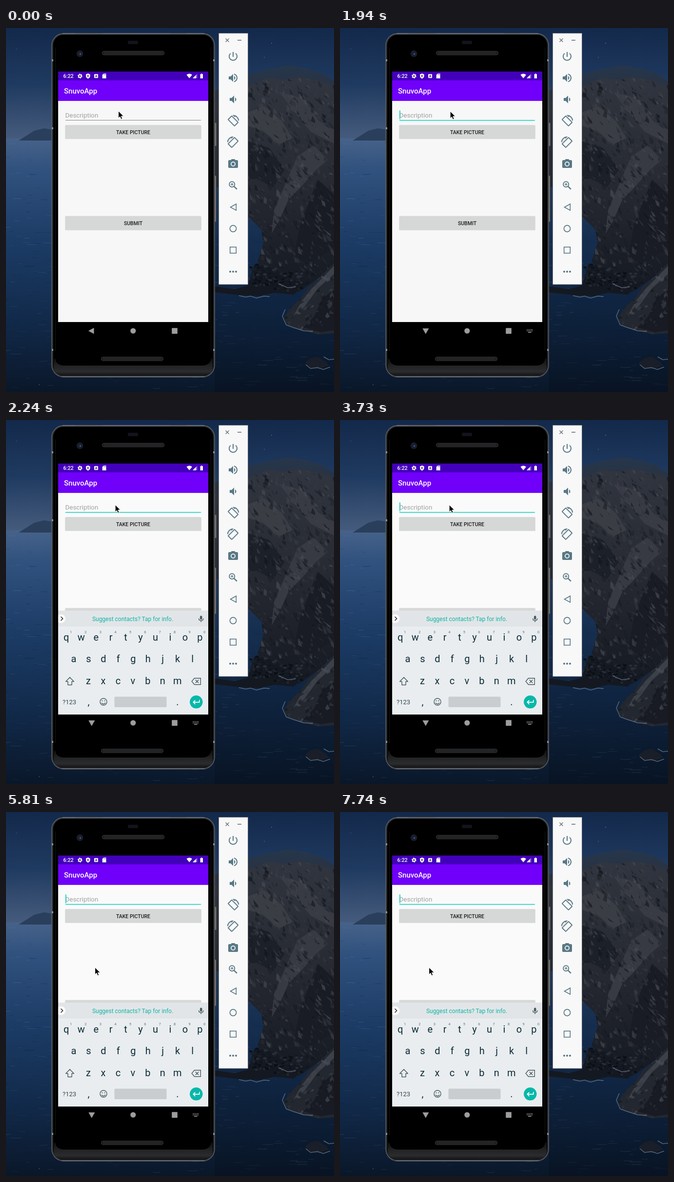
Animation of 673 by 744 pixels, one loop 8000 ms. Source, as an HTML page:

```html
<!DOCTYPE html>
<html lang="en">
<head>
<meta charset="utf-8">
<title>Phone emulator</title>
<style>
html, body { margin: 0; width: 100%; height: 100%; overflow: hidden; background: #0b1d38; }
svg { display: block; }
text { font-family: Roboto, sans-serif; }
.mid { text-anchor: middle; }
.med { font-weight: 500; }
.line { fill: none; stroke: #587885; stroke-width: 1.8; }
.tool { fill: #587885; }
.key { font-size: 20px; fill: #0d2c36; }
.hint { font-size: 7.5px; fill: #5d6f77; }
.thin { fill: none; stroke: #48595f; stroke-width: 1.4; }
</style>
</head>
<body>
<svg id="stage" width="673" height="744" viewBox="0 0 673 744">
<defs>
  <linearGradient id="sky" x2="0" y2="1">
    <stop offset="0" stop-color="#13294b"/><stop offset=".5" stop-color="#1f3a60"/><stop offset="1" stop-color="#475d7e"/>
  </linearGradient>
  <linearGradient id="sea" x2="0" y2="1">
    <stop offset="0" stop-color="#46628a"/><stop offset=".12" stop-color="#31527e"/><stop offset=".4" stop-color="#1c3c66"/>
    <stop offset=".7" stop-color="#122b4c"/><stop offset="1" stop-color="#0a1729"/>
  </linearGradient>
  <linearGradient id="far" x2="0" y2="1">
    <stop offset="0" stop-color="#26364c"/><stop offset=".4" stop-color="#2a313d"/><stop offset="1" stop-color="#22262f"/>
  </linearGradient>
  <linearGradient id="cliff" x2="0" y2="1">
    <stop offset="0" stop-color="#30353f"/><stop offset=".45" stop-color="#282b33"/><stop offset="1" stop-color="#151922"/>
  </linearGradient>
  <linearGradient id="chin" x2="0" y2="1">
    <stop offset="0" stop-color="#060606"/><stop offset=".45" stop-color="#202123"/><stop offset=".8" stop-color="#2b2c2e"/><stop offset="1" stop-color="#141415"/>
  </linearGradient>
  <clipPath id="screen"><rect x="107" y="89" width="308" height="513"/></clipPath>
  <clipPath id="land"><path id="coast" d="M428 150L497 118 540 102 572 106 600 100 640 108 673 118V482L640 512 600 540 560 524 530 492 516 478 528 440 524 412 497 386 428 320Z"/></clipPath>
  <clipPath id="crag"><path id="crest" d="M673 480L648 506 622 528 605 552 584 572 570 592 577 608 606 618 640 626 673 624Z"/></clipPath>
</defs>

<g id="wallpaper">
  <rect width="673" height="230" fill="url(#sky)"/>
  <rect y="226" width="673" height="518" fill="url(#sea)"/>
  <path d="M26 230L42 220 58 210 78 205 97 208V230Z" fill="#2a3f5c"/>
  <rect x="428" y="300" width="245" height="444" fill="#060c16" opacity=".28"/>
  <g id="waves"></g>
  <path d="M428 128L470 108 497 94 530 86 555 80 580 76 620 83 648 92 673 108V260H428Z" fill="url(#far)"/>
  <use href="#coast" fill="url(#cliff)"/>
  <g id="rocks" clip-path="url(#land)">
    <path d="M497 172L530 160 566 190 588 225 560 238 530 212 497 200Z" fill="#3b3d45"/>
    <path d="M560 130L612 145 642 190 673 208V236L625 212 592 172Z" fill="#393b44"/>
    <path d="M497 232L540 245 572 290 548 326 515 308 497 310Z" fill="#1c2028"/>
    <path d="M598 262L632 240 660 270 636 290 605 325 580 350 560 395 545 420 550 372Z" fill="#383a43"/>
    <path d="M640 310L673 340V450L625 480 590 470 604 400Z" fill="#191c24"/>
  </g>
  <g id="grit" clip-path="url(#land)"></g>
  <path d="M428 528L470 534 497 526 510 482 550 492 590 515 618 522 590 545 550 541 520 548 480 546 428 540Z" fill="#141820"/>
  <g id="boulders"></g>
  <use href="#crest" fill="#23272f"/>
  <path d="M673 486L650 510 627 533 607 558 590 588 612 570 640 532 673 503Z" fill="#3b4049"/>
  <path d="M673 535L650 552 632 590 610 612 645 622 673 618Z" fill="#181b23"/>
  <g id="cracks" clip-path="url(#crag)"></g>
  <path d="M613 684L625 675 640 672 655 681 663 690 642 697 622 695Z" fill="#191e28"/>
  <g fill="none" stroke="#8296ad" stroke-width="1.5" opacity=".6">
    <path d="M478 547l14 3 10-2 12 4 15-4 12 1M573 575l-6 14 8 18 14 5 22 7 19 1M615 688l10 8 14-2 12 4 14-5M652 672l10 6 11-1M560 523l18 8 16-2"/>
  </g>
  <g fill="#7f93b3"><circle cx="545" cy="31" r=".8"/><circle cx="530" cy="60" r=".7"/><circle cx="68" cy="729" r=".7"/><circle cx="22" cy="43" r=".6"/></g>
</g>

<g id="phone">
  <path d="M428 194h4v47h-4zM428 302h3.500v94h-3.500z" fill="#6e6f70"/>
  <path d="M432 194v47M431.500 302v94" stroke="#2d2e30"/>
  <rect x="94" y="11.500" width="334" height="701.500" rx="24" fill="#242527" stroke="#67696b" stroke-width="1.300"/>
  <path d="M116 11.500H407M114 712.800H408" stroke="#808285" stroke-width="1.300"/>
  <path d="M141 10.600h57M336 10.600h34" stroke="#45474a" stroke-width="1.200"/>
  <path d="M94 66h4M424 66h4M94 205h4M94 658h4M424 658h4" stroke="#8a9196" stroke-width="4"/>
  <rect x="97" y="14" width="328" height="696" rx="21"/>
  <path d="M98 672Q101 688 116 690H406Q421 688 424 672V690Q424 710 405 710H117Q98 710 98 690Z" fill="url(#chin)"/>
  <path d="M100 676Q102 690 119 691H403Q420 690 422 676" fill="none" stroke="#28292b"/>
  <path d="M101.500 40V660M420.500 40V660" stroke="#151618"/>
  <rect x="250" y="26" width="21" height="7" rx="2" fill="#12131b"/>
  <g fill="#1b1c1e" stroke="#38393b">
    <rect x="197.500" y="47.500" width="127" height="7.500" rx="3.500"/><rect x="195.500" y="672.500" width="127" height="7.500" rx="3.500"/>
  </g>
  <path d="M202 51.300H320M200 676.300H318" stroke="#303134" stroke-width="3" stroke-dasharray="1.500 1.500"/>
  <circle cx="151.500" cy="52.500" r="6.800" fill="#1b1e24"/>
  <circle cx="152" cy="53" r="3.500" fill="#15203d"/><circle cx="152.500" cy="53" r="1.500" fill="#4563a3"/>
</g>

<g clip-path="url(#screen)">
  <rect id="page" x="107" y="89" width="308" height="512"/>
  <rect x="107" y="107" width="308" height="42" fill="#7000fa"/>
  <rect x="107" y="89" width="308" height="18" fill="#4300ba"/>
  <text class="med" x="117.500" y="102" font-size="10.700" fill="#fff">6:22</text>
  <g fill="#fff">
    <circle cx="151.800" cy="98.200" r="2.700" fill="none" stroke="#fff" stroke-width="2"/>
    <circle cx="151.800" cy="98.200" r="4.200" fill="none" stroke="#fff" stroke-width="1.400" stroke-dasharray="2.200 2.198"/>
    <path d="M168.300 93l4.300 1.700v3.300q0 3.700-4.300 5.500-4.300-1.800-4.300-5.500v-3.300z"/>
    <path d="M167 95.800l3.600 2.300-3.600 2.300z" fill="#4300ba"/>
    <rect x="181" y="94.200" width="8" height="8" rx="1"/>
    <path d="M183.200 100.600l1.800-4.600 1.800 4.600M183.900 99.200h2.200" fill="none" stroke="#4300ba"/>
    <path d="M200.300 93.200h5.200v9.700h-7.800v-7.200z"/>
    <path d="M201 94.500v1.800M202.700 94.500v1.800M204.300 94.500v1.800" stroke="#4300ba" stroke-width=".7"/>
    <path d="M370.500 95.700q5.700-4.400 11.400 0l-5.700 7.100z"/>
    <path d="M392.300 93.600v9.200h-9.200z" opacity=".4"/><path d="M389.600 96.300v6.500h-6.500z"/>
    <path d="M400.300 93.200h2v1h1.700v8.800h-5.400v-8.800h1.700z"/>
  </g>
  <text class="med" x="119" y="134" font-size="15" fill="#fff">SnuvoApp</text>
  <text x="121.500" y="182.800" font-size="13.400" fill="#a0a0a0">Description</text>
  <rect id="rule" x="122" y="188" width="278"/>
  <rect id="caret" x="122" y="168.500" width="1.600" height="18" fill="#00cdb9"/>
  <g class="med mid" font-size="10.500" fill="#1d1d1d">
    <g fill="#dcdddd"><rect x="121" y="198.500" width="280" height="28.500" rx="1.500"/><rect x="121" y="384.500" width="280" height="29" rx="1.500"/></g>
    <g fill="#d6d7d7"><rect x="122" y="198.500" width="278" height="27.800" rx="1.500"/><rect x="122" y="384.500" width="278" height="28.300" rx="1.500"/></g>
    <text x="261" y="216.500">TAKE PICTURE</text><text x="261" y="402.500">SUBMIT</text>
  </g>
  <g id="keyboard">
    <rect id="strip" x="107" y="389.500" width="308" height="33"/>
    <rect id="bed" x="107" y="422" width="308" height="180"/>
    <circle cx="113" cy="406" r="9" fill="#fdfdfd"/>
    <path d="M112.500 402l4 4-4 4" fill="none" stroke="#222" stroke-width="1.500"/>
    <text class="mid" x="260" y="410.500" font-size="12" fill="#0fb5a6">Suggest contacts? Tap for info.</text>
    <rect x="398" y="400" width="4.400" height="8" rx="2.200" fill="#4a5960"/>
    <path d="M395.600 405.500q0 4.500 4.600 4.500 4.600 0 4.600-4.500M400.200 410v3" class="thin" stroke-width="1.200"/>
    <g id="keys"></g>
    <path d="M131 526l8.300 8.500h-4.300v7h-8v-7h-4.300z" class="thin" stroke-linejoin="round"/>
    <path d="M386.500 527.700h12.800v13h-12.800l-5.300-6.500zM388.700 530.900l6.600 6.600M395.300 530.900l-6.600 6.600" class="thin"/>
    <text x="116" y="580.500" font-size="13" fill="#34474f">?123</text>
    <g class="thin"><circle cx="200" cy="576" r="7"/><path d="M196 578q4 5 8 0"/></g>
    <circle cx="197.500" cy="574" r="1.100" fill="#48595f"/><circle cx="202.500" cy="574" r="1.100" fill="#48595f"/>
    <rect id="space" x="222.500" y="565.500" width="107" height="21.500" rx="2"/>
    <circle cx="390.300" cy="576.300" r="13.200" fill="#06b8a9"/>
    <path d="M396.800 572.200v4.600h-12M388.300 572.800l-4 4 4 4" fill="none" stroke="#fff" stroke-width="1.700"/>
  </g>
</g>

<g fill="#9d9d9d">
  <path id="back"/>
  <circle cx="260.800" cy="619" r="5.600"/><rect x="340.200" y="613.300" width="11.600" height="11.600" rx="1"/>
  <g id="kbIcon" fill="none" stroke="#9d9d9d" stroke-width="1.600">
    <path d="M383.200 616.500h12M383.200 619.300h12" stroke-dasharray="1.500 1.100"/><path d="M385.800 622h6.800"/>
  </g>
</g>

<g id="panel">
  <rect x="436.500" y="10.800" width="60" height="513.400" fill="#f8f8f8" stroke="#5c626a" stroke-width=".7"/>
  <path d="M450.500 21.500l7 7M457.500 21.500l-7 7M475 25h8" stroke="#5d6870" stroke-width="1.300"/>
  <g class="tool">
    <path transform="translate(454 46)" d="M13 3h-2v10h2V3zm4.830 2.170l-1.420 1.420C17.990 7.860 19 9.810 19 12c0 3.870-3.130 7-7 7s-7-3.130-7-7c0-2.190 1.010-4.140 2.580-5.420L6.170 5.170C4.230 6.820 3 9.260 3 12c0 4.970 4.030 9 9 9s9-4.030 9-9c0-2.740-1.230-5.180-3.170-6.830z"/>
    <path transform="translate(454 90)" d="M3 9v6h4l5 5V4L7 9H3zm13.500 3c0-1.770-1.020-3.290-2.500-4.030v8.050c1.480-.73 2.500-2.250 2.500-4.020zM14 3.230v2.060c2.890.86 5 3.540 5 6.710s-2.110 5.850-5 6.710v2.060c4.010-.91 7-4.490 7-8.770s-2.990-7.860-7-8.770z"/>
    <path transform="translate(454 134)" d="M18.500 12c0-1.770-1.020-3.290-2.500-4.030v8.050c1.480-.73 2.500-2.250 2.500-4.020zM5 9v6h4l5 5V4L9 9H5z"/>
    <path id="turn" transform="translate(454 178)" stroke="#587885" stroke-width=".6" d="M16.480 2.520c3.270 1.550 5.610 4.720 5.970 8.480h1.500C23.440 4.840 18.290 0 12 0l-.66.030 3.810 3.810 1.330-1.320zM10.230 1.750c-.59-.59-1.540-.59-2.120 0L1.750 8.110c-.59.59-.59 1.540 0 2.120l12.020 12.020c.59.59 1.540.59 2.120 0l6.360-6.360c.59-.59.59-1.540 0-2.120L10.230 1.750zm4.600 19.440L2.810 9.170l6.360-6.360 12.020 12.020-6.360 6.360z"/>
    <use href="#turn" transform="translate(932 44) scale(-1 1)"/>
    <path fill-rule="evenodd" d="M463 268l-1.800 2H458q-2 0-2 2v12q0 2 2 2h16q2 0 2-2v-12q0-2-2-2h-3.200l-1.800-2zM466 273a5 5 0 1 1 0 10 5 5 0 1 1 0-10zm0 1.800a3.200 3.200 0 1 0 0 6.400 3.200 3.200 0 1 0 0-6.400z"/>
    <circle cx="460" cy="498" r="2"/><circle cx="466" cy="498" r="2"/><circle cx="472" cy="498" r="2"/>
  </g>
  <g class="line">
    <circle cx="463.700" cy="319.500" r="5.600"/><path d="M467.800 323.600l6 6" stroke-width="2.500"/>
    <path d="M460.800 319.500h5.800M463.700 316.600v5.800" stroke-width="1.400"/>
    <path d="M460.500 366.200l11.800-6.500v13z" stroke-width="1.600"/><circle cx="466" cy="410" r="6.600" stroke-width="1.700"/>
    <rect x="459.700" y="447.700" width="12.600" height="12.600" stroke-width="1.600"/>
  </g>
</g>
<path id="mouse" d="M.6 .8V15.200L3.900 12.200 6.100 17.400 8.700 16.300 6.500 11.200H11.200Z" stroke="#fff" stroke-width="1" stroke-linejoin="round"/>
</svg>
<script>
const LOOP = 8000;
const FOCUS = 1650, NAV = 1940, RISE = 2090, SETTLE = 2240;
const BLINKS = [1790, 2240, 2840, 3280, 3730, 4330, 4770, 5210, 5810, 6250, 6700, 7300, 7740];
// time, left, top
const MOUSE = [
  [0, 230, 169], [600, 228, 169], [750, 226, 170], [900, 225.500, 169.500], [2090, 223.500, 172.700],
  [4180, 239, 257], [4330, 256, 247], [4470, 261, 232], [4620, 263, 219],
  [4770, 187, 298], [4920, 182, 317]
];
const $ = id => document.getElementById(id);
const set = (id, attrs) => { for (const k in attrs) $(id).setAttribute(k, attrs[k]); };

let seed = 17;
const rand = (a, b) => {
  seed = (seed * 16807) % 2147483647;
  return a + (b - a) * seed / 2147483647;
};
const num = v => v.toFixed(1);

// Soft streaks that give the water its grain
function waves() {
  let out = "";
  for (let i = 0; i < 700; i++) {
    const y = rand(230, 744), near = (y - 230) / 514, l = rand(6, 14 + 14 * near);
    out += `<path d="M${num(rand(-10, 673))} ${num(y)}q${num(l / 2)} ${num(rand(-1, 2))} ${num(l)} 0" fill="none"
      stroke="${i % 2 ? "#5878a0" : "#081a33"}" stroke-width="${num(rand(.5, 1.4))}" opacity="${num(rand(.1, .4) * (1.1 - near * .6))}"/>`;
  }
  $("waves").innerHTML = out;
}

// Small broken facets for stone
function facets(id, count, [x0, y0, x1, y1], colors, size, lean) {
  let out = "";
  for (let i = 0; i < count; i++) {
    const s = rand(size / 3, size);
    out += `<path d="M${num(rand(x0, x1))} ${num(rand(y0, y1))}l${num(s * rand(.3, 1))} ${num(s * lean * rand(.2, 1))} ${num(s * rand(-.2, .6))} ${num(s * rand(.1, .9))} ${num(-s * rand(.4, .8))} ${num(-s * lean * rand(.1, .6))}z"
      fill="${colors[i % colors.length]}" opacity="${num(rand(.25, .7))}"/>`;
  }
  $(id).innerHTML = out;
}

function boulders() {
  let out = "";
  for (let i = 0; i < 110; i++) {
    const x = rand(497, 608), y = 488 + (x - 500) * .2 + rand(-8, 36), r = rand(1.500, 4.500);
    out += `<ellipse cx="${num(x)}" cy="${num(y)}" rx="${num(r)}" ry="${num(r * .65)}" fill="${["#0c1017", "#282d37", "#191e27"][i % 3]}"/>`;
  }
  $("boulders").innerHTML = out;
}

function keys() {
  const step = 30.450;
  const row = (chars, x, y) => [...chars].map((c, i) =>
    `<text class="key mid" x="${x + i * step}" y="${y}">${c}</text>`).join("");
  const hints = [..."1234567890"].map((c, i) =>
    `<text class="hint mid" x="${133 + i * step}" y="436">${c}</text>`).join("");
  $("keys").innerHTML = row("qwertyuiop", 123.800, 451) + hints + row("asdfghjkl", 139, 495) +
    row("zxcvbnm", 169, 539.500) + row(",", 169.500, 583) + row(".", 352, 583);
}

function render(t) {
  const focused = t >= FOCUS, open = t >= RISE, rising = open && t < SETTLE;
  const [, x, y] = MOUSE.filter(m => m[0] <= t).pop();
  const caretOn = BLINKS.filter(b => b <= t).length % 2 === 1;
  set("mouse", { transform: `translate(${x} ${y})` });
  set("caret", { visibility: caretOn ? "visible" : "hidden" });
  set("rule", focused ? { height: 1.500, fill: "#0bd2c0" } : { height: 1, fill: "#858585" });
  set("page", { fill: open ? "#fafafa" : "#f7f7f7" });
  set("back", { d: t >= NAV ? "M169.300 614h13l-6.500 11.500z" : "M180.500 612.800v12.400l-11.500-6.200z" });
  set("kbIcon", { visibility: t >= NAV ? "visible" : "hidden" });
  set("keyboard", { visibility: open ? "visible" : "hidden", transform: `translate(0 ${rising ? 1 : 0})` });
  set("strip", { fill: rising ? "#e9edef" : "#e2e5e7", opacity: rising ? .88 : 1 });
  set("bed", { fill: rising ? "#eceff1" : "#e9edf0" });
  set("space", { fill: rising ? "#c8d0d4" : "#c9cdd0" });
}

waves();
facets("grit", 900, [490, 98, 673, 540], ["#484a52", "#12151c", "#373a42", "#1a1d25"], 13, 1);
facets("cracks", 150, [565, 478, 673, 626], ["#4b5058", "#11141b", "#333841"], 11, -1);
boulders();
keys();

const start = performance.now();
function tick() {
  render((performance.now() - start) % LOOP);
  requestAnimationFrame(tick);
}
tick();
</script>
</body>
</html>
```
